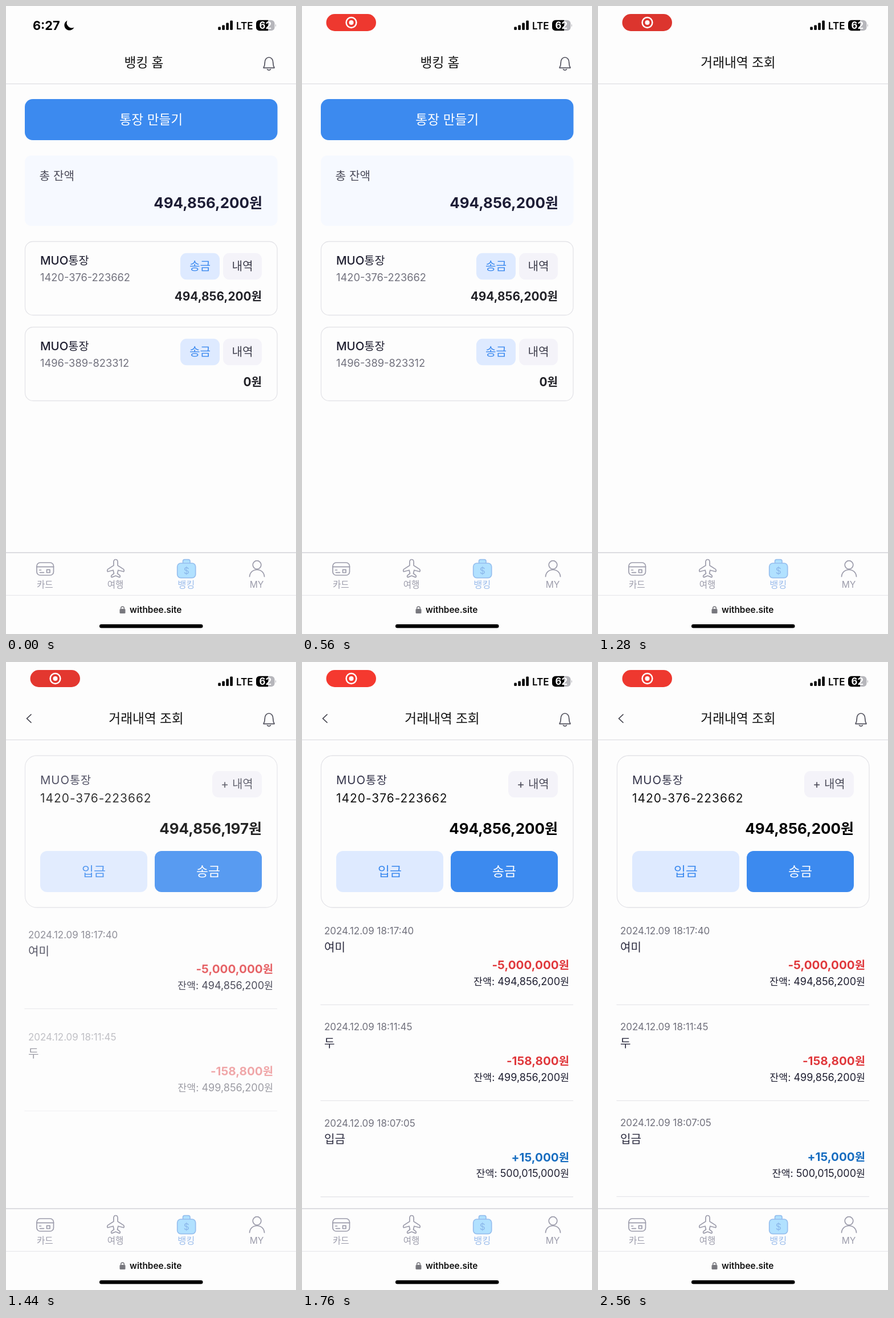
Recreate the animation shown at these times as an HTML page. Size 509 px wide and 1100 px high, loop 2.64 s.

```html
<!DOCTYPE html>
<html lang="ko">
<head>
<meta charset="utf-8">
<title>뱅킹 홈</title>
<style>
  html, body { margin: 0; width: 100%; height: 100%; overflow: hidden; background: #fdfdfd; }
  svg { display: block; width: 100vw; height: 100vh; }
  text { font-family: Inter, 'Noto Sans CJK KR', 'Noto Sans CJK', sans-serif; white-space: pre; }
  .line { fill: none; stroke-width: 1.7; stroke-linecap: round; stroke-linejoin: round; }
</style>
</head>
<body>
<svg id="stage" viewBox="0 0 509 1100"></svg>
<script>
const LOOP = 2640, PAGE_SWITCH = 1200, LOADED = 1285, TOTAL = 494856200;
const BLUE = '#3c8aef', PALE = '#deeaff', GREY = '#f4f3f9', INK = '#1e1e30', MUTED = '#9c9cab';

// Hangul is set slightly smaller than Latin so that both look the same size.
const mixed = label => label.replace(/[가-힣]+/g, '<tspan font-size=".965em">$&</tspan>');
const text = (x, y, size, fill, label, { anchor = 'start', weight = 400, spacing = 0, id = '' } = {}) =>
  `<text ${id && `id="${id}"`} x="${x}" y="${y}" font-size="${size}" fill="${fill}" text-anchor="${anchor}"
    font-weight="${weight}" letter-spacing="${spacing}">${mixed(label)}</text>`;
const mid = { anchor: 'middle' }, bold = { weight: 700 }, end = { anchor: 'end' };
const rect = (x, y, w, h, r, fill, stroke = 'none', extra = '') =>
  `<rect x="${x}" y="${y}" width="${w}" height="${h}" rx="${r}" fill="${fill}" stroke="${stroke}" ${extra}/>`;
const rule = (y, color, x1 = 0, x2 = 509) =>
  `<path d="M${x1} ${y}H${x2}" stroke="${color}" stroke-width="1.3"/>`;
const line = (d, color = MUTED) => `<path class="line" d="${d}" stroke="${color}"/>`;
const button = (x, y, w, h, r, fill, color, label, size) =>
  rect(x, y, w, h, r, fill) + text(x + w / 2, y + h / 2 + size * .35, size, color, label, mid);
const won = n => n.toLocaleString('en-US') + '원';

const statusBar = () => `
  <g id="clock">
    ${text(47, 41.7, 21.7, '#000', '6:27', bold)}
    <path d="M107.5 25.5A9 9 0 1 0 119.5 37.5A9 9 0 0 1 107.5 25.5Z"/>
  </g>
  <g id="recording">
    ${rect(42.5, 14, 87.5, 30, 15, 'red', 'none', 'id="pill"')}
    <circle cx="86.5" cy="29" r="8.9" fill="none" stroke="#fff" stroke-width="2.5"/>
    <circle cx="86.5" cy="29" r="4" fill="#fff"/>
  </g>
  ${[5.5, 8.5, 12.5, 16.5].map((h, i) => rect(372.3 + 7 * i, 42 - h, 4.6, h, 1.3, '#000')).join('')}
  ${text(404, 40.5, 17, '#000', 'LTE', { weight: 600 })}
  ${rect(439, 24.8, 32.5, 18.4, 6, '#b6b6bb')}
  <path d="M460 24.8H445a6 6 0 0 0-6 6v6.4a6 6 0 0 0 6 6H460Z"/>
  <path d="M472.8 31.2q2.4 2.8 0 5.6Z" fill="#b6b6bb"/>
  ${text(455.3, 40, 16.8, '#fff', '62', { ...mid, ...bold })}`;

const account = (y, number, amount) => `
  ${rect(33.5, y + .5, 442.5, 129, 14, 'none', '#e4e4e8', 'stroke-width="1.3"')}
  ${text(60, y + 41, 20.4, INK, 'MUO통장', { weight: 500 })}
  ${text(60, y + 70.3, 18.3, '#72727e', number)}
  ${button(306, y + 20.7, 69, 46.5, 11, PALE, BLUE, '송금', 20.9)}
  ${button(381, y + 20.7, 68, 46.5, 11, GREY, '#3c3c4a', '내역', 20.9)}
  ${text(449, y + 104, 20.8, '#222228', won(amount), { ...end, ...bold })}`;

const homePage = () => `
  ${text(242, 106.7, 23.5, '#111', '뱅킹 홈', { ...mid, weight: 500 })}
  ${button(33, 163, 443.5, 72, 14, BLUE, '#fff', '통장 만들기', 23.5)}
  ${rect(33, 262, 443.5, 123, 11, '#f6f9ff')}
  ${text(58.5, 304.5, 20.9, '#4a4a58', '총 잔액')}
  ${text(450, 354, 25.9, '#1d1d35', won(TOTAL), { ...end, ...bold })}
  ${account(412, '1420-376-223662', TOTAL)}
  ${account(562, '1496-389-823312', 0)}`;

const entry = ([time, name, change, balance], i) => `
  <g class="entry">
    <g transform="translate(0 ${168 * i})">
      ${text(39, 477.2, 16.97, '#70707c', time)}
      ${text(39, 507, 20.9, '#2a2a3e', name)}
      ${text(469, 538.4, 20.6, change < 0 ? '#e0393d' : '#176dc0', (change > 0 ? '+' : '') + won(change), { ...end, ...bold })}
      ${text(469, 565.7, 18, INK, '잔액: ' + won(balance), end)}
      ${rule(600.3, '#e6e6ea', 32.5, 476)}
    </g>
  </g>`;

const historyPage = () => `
  <g id="accountCard">
    ${rect(33.5, 164, 442.5, 266, 20, 'none', '#e4e4e8', 'stroke-width="1.3"')}
    ${text(60, 214, 20.4, '#34344a', 'MUO통장', { spacing: .9 })}
    ${text(60, 245.6, 20.9, '#111', '1420-376-223662', { spacing: 1 })}
    ${button(362, 191, 87, 46.3, 11, GREY, '#4a4a58', '+ 내역', 20.7)}
    ${text(449, 301.3, 25.9, '#000', '', { ...end, ...bold, id: 'balance' })}
    ${button(60, 331, 188, 72, 12, PALE, BLUE, '입금', 23.6)}
    ${button(261, 331, 188, 72, 12, BLUE, '#fff', '송금', 23.6)}
  </g>
  ${[
    ['2024.12.09 18:17:40', '여미', -5000000, 494856200],
    ['2024.12.09 18:11:45', '두', -158800, 499856200],
    ['2024.12.09 18:07:05', '입금', 15000, 500015000]
  ].map(entry).join('')}`;

const navBar = () => `
  ${rect(0, 957, 509, 143, 0, '#fdfdfd')}
  ${rule(957.5, '#d0d0d5')}${rule(1032.3, '#e8e8ec')}
  ${rect(54, 975, 29.5, 22, 6, 'none', MUTED, 'stroke-width="1.7"')}
  ${line('M54 982.3H83.5M58.5 988H61.5M59.5 992.3H66.5M71.5 987.3h5.5v5.2h-5.5Z')}
  ${line(`M192.5 969.5c2.3 0 3.6 2 3.6 4.8v5.700l10 6.4c1.3 1 1.6 3.6.4 4.4l-9.600-2.600-1.4 5.8 4.3 3.4c1 1 .6 3.2-.6 3.2l-6.700-2.600
    -6.700 2.600c-1.2 0-1.6-2.2-.6-3.2l4.3-3.4-1.4-5.8-9.600 2.600c-1.2-.8-.9-3.4.4-4.4l10-6.4v-5.700c0-2.8 1.3-4.8 3.6-4.8Z`.replace(/00\b/g, ''))}
  ${rect(310.5, 969.7, 12.5, 10, 3, '#b1e1ff', '#96bfee', 'stroke-width="1.7"')}
  ${rect(300.7, 976, 32, 25.7, 6, '#b1e1ff', '#96bfee', 'stroke-width="1.7"')}
  ${text(316.7, 994.5, 15.5, '#8ab6ea', '$', mid)}
  <circle class="line" cx="440.5" cy="979" r="7.3" stroke="${MUTED}"/>
  ${line('M427.5 999.5c.6-7.6 5.8-12 13-12s12.4 4.4 13 12')}
  ${text(68.3, 1018.7, 16.2, MUTED, '카드', mid)}
  ${text(192, 1018.7, 16.2, MUTED, '여행', mid)}
  ${text(316.3, 1019, 17, '#9abcec', '뱅킹', { ...mid, weight: 500 })}
  ${text(440, 1018.7, 15.6, MUTED, 'MY', mid)}
  ${rect(199.5, 1056, 10, 8, 1.5, '#78787e')}
  <path d="M201.7 1057v-2.3a2.8 2.8 0 0 1 5.6 0V1057" fill="none" stroke="#78787e" stroke-width="1.5"/>
  ${text(217, 1063, 15.4, '#111', 'withbee.site', { weight: 600 })}
  ${rect(164, 1083, 181.5, 6.6, 3.3, '#000')}`;

document.getElementById('stage').innerHTML = `
  ${statusBar()}
  ${rule(136.3, '#dedee3')}
  <g id="home">${homePage()}</g>
  <g id="history">
    ${text(246, 106.7, 23.5, '#111', '거래내역 조회', { ...mid, weight: 500 })}
    <g id="details">${line('M44 92L36.5 99L44 106', '#3c3c46')}${historyPage()}</g>
  </g>
  <g id="bell">
    ${line('M452 108.3h19c-2-3-2.3-5-2.3-9.3c0-5.5-3-9-7.2-9s-7.2 3.5-7.2 9c0 4.3-.3 6.3-2.3 9.3Z', '#50505c')}
    ${line('M458.5 111q3 2.8 6 0', '#50505c')}
  </g>
  ${navBar()}`;

const $ = id => document.getElementById(id);
const entries = [...document.querySelectorAll('.entry')];
const show = (id, visible) => $(id).setAttribute('display', visible ? 'inline' : 'none');
const easeOut = (t, start, duration) =>
  1 - (1 - Math.min(1, Math.max(0, (t - start) / duration))) ** 1.7;

function draw(t) {
  const appear = easeOut(t, 80, 320);
  $('clock').setAttribute('opacity', Math.max(0, 1 - 2 * appear));
  $('recording').setAttribute('opacity', appear);
  $('recording').setAttribute('transform',
    `translate(86.5 29) scale(${.5 + .5 * appear}) translate(-86.5 -29)`);
  const pulse = Math.cos((t - 100) / 1000 * Math.PI);
  $('pill').setAttribute('fill', `rgb(${236 + 19 * pulse},${56 + 3 * pulse},${47 + pulse})`);

  show('home', t < PAGE_SWITCH);
  show('history', t >= PAGE_SWITCH);
  show('details', t >= LOADED);
  show('bell', t < PAGE_SWITCH || t >= LOADED);

  $('accountCard').setAttribute('opacity', easeOut(t, LOADED, 232));
  const remaining = Math.min(TOTAL, 3 * 10 ** ((1440 - t) / 20));
  $('balance').innerHTML = mixed(won(Math.round(TOTAL - remaining)));
  entries.forEach((group, i) => {
    const progress = easeOut(t, 1240 + 104 * i, 340);
    group.setAttribute('opacity', progress);
    group.setAttribute('transform', `translate(0 ${32 * (1 - progress)})`);
  });
}

const startTime = performance.now();
function tick() {
  draw((performance.now() - startTime) % LOOP);
  requestAnimationFrame(tick);
}
tick();
</script>
</body>
</html>
```
